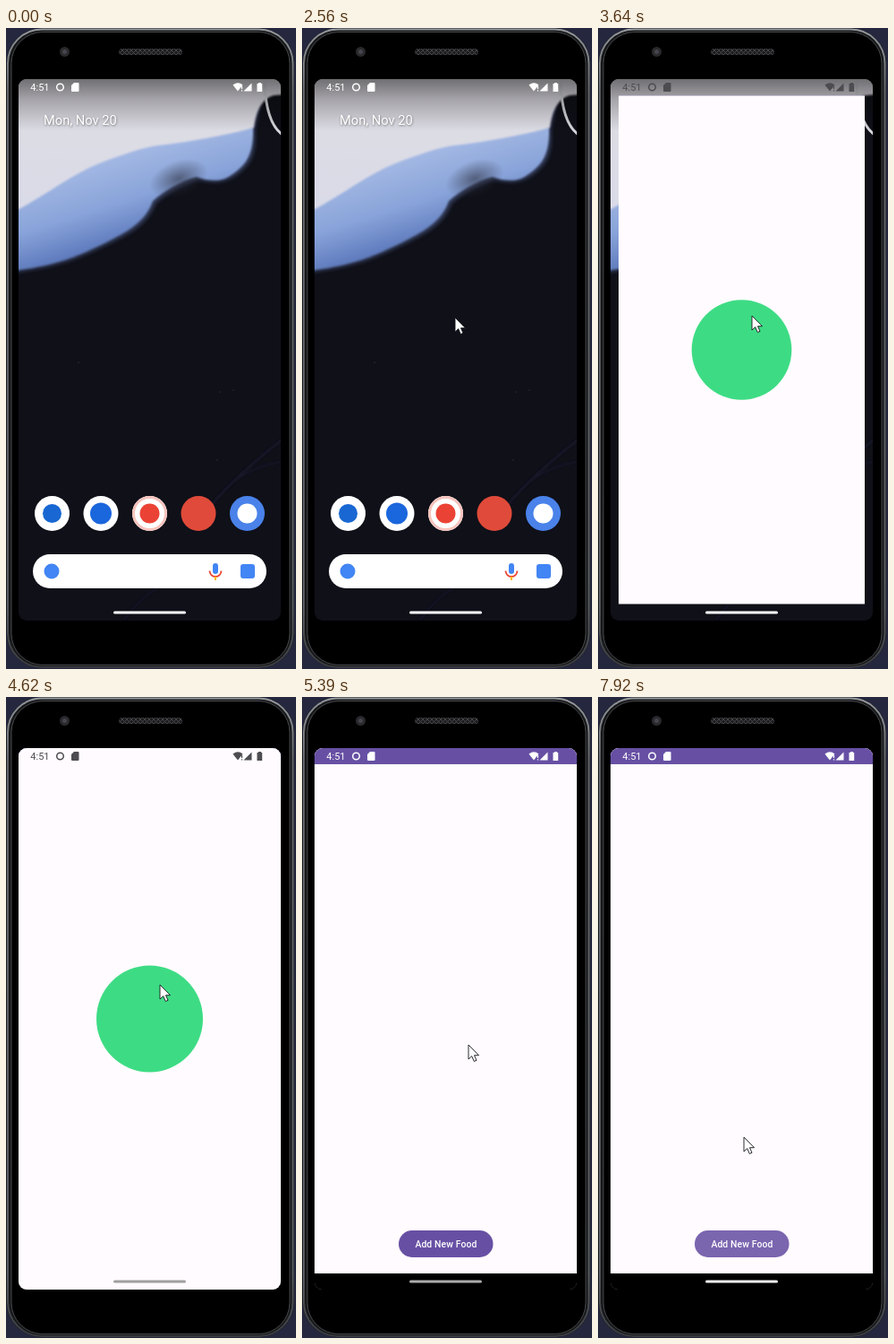
Write an HTML page that moves like this. It is 324 by 715 pixels and loops after 7.99 s.

```html
<!DOCTYPE html>
<html lang="en">
<head>
<meta charset="utf-8">
<title>Phone app launch</title>
<style>
html, body { margin: 0; width: 100%; height: 100%; overflow: hidden; background: #24273d; }
svg { display: block; width: 324px; height: 715px; font-family: Roboto, Arial, sans-serif; }
</style>
</head>
<body>
<svg viewBox="0 0 324 715" xmlns="http://www.w3.org/2000/svg">
  <defs>
    <clipPath id="screen"><rect x="14" y="57" width="293" height="604" rx="9"/></clipPath>
    <clipPath id="pill"><rect x="108" y="595" width="105.500" height="30" rx="15"/></clipPath>
    <linearGradient id="scrim" x1="0" y1="0" x2="0" y2="1">
      <stop offset="0" stop-color="#000" stop-opacity=".5"/>
      <stop offset=".4" stop-color="#000" stop-opacity=".25"/>
      <stop offset="1" stop-color="#000" stop-opacity="0"/>
    </linearGradient>
    <linearGradient id="blue" gradientUnits="userSpaceOnUse" x1="100" y1="145" x2="130" y2="240">
      <stop offset="0" stop-color="#a6bae4"/>
      <stop offset=".55" stop-color="#89a4da"/>
      <stop offset="1" stop-color="#5c78bb"/>
    </linearGradient>
    <linearGradient id="pale" x1="0" y1="0" x2="0" y2="1">
      <stop offset="0" stop-color="#dfdde2"/>
      <stop offset="1" stop-color="#d9dbe8"/>
    </linearGradient>
    <linearGradient id="metal" x1="0" y1="0" x2="0" y2="1">
      <stop offset="0" stop-color="#96999c"/>
      <stop offset=".1" stop-color="#62656a"/>
      <stop offset=".9" stop-color="#5a5d61"/>
      <stop offset="1" stop-color="#3a3c40"/>
    </linearGradient>
    <radialGradient id="shade">
      <stop offset="0" stop-color="#2c2f3c" stop-opacity=".6"/>
      <stop offset="1" stop-color="#2c2f3c" stop-opacity="0"/>
    </radialGradient>
    <pattern id="mesh" width="5" height="5" patternUnits="userSpaceOnUse">
      <path d="M0 0L5 5M5 0L0 5" stroke="#48484b" stroke-width=".9"/>
    </pattern>
    <filter id="soft" x="-10%" y="-10%" width="120%" height="120%"><feGaussianBlur stdDeviation="2"/></filter>
    <filter id="blur" x="-10%" y="-10%" width="120%" height="120%"><feGaussianBlur stdDeviation="1"/></filter>
  </defs>

  <rect width="324" height="715" fill="#24273d"/>
  <rect x=".5" y=".5" width="321.500" height="713.500" rx="39" fill="#17181a"/>
  <rect x="2" y="1.500" width="318.500" height="711.500" rx="38" fill="none" stroke="url(#metal)" stroke-width="2"/>
  <rect x="6" y="4.500" width="311" height="706" rx="35" fill="#000" stroke="#46484b"/>
  <circle cx="65.500" cy="26.500" r="5.500" fill="#29292c"/>
  <circle cx="65.500" cy="26.500" r="2.500" fill="#45454f"/>
  <rect x="126" y="23" width="71" height="7" rx="3.500" fill="#1d1d1f"/>
  <rect x="126" y="23" width="71" height="7" rx="3.500" fill="url(#mesh)"/>

  <g clip-path="url(#screen)">
    <g id="home">
      <rect x="14" y="57" width="293" height="604" fill="#0f1018"/>
      <g id="specks" fill="#3a3545"></g>
      <g fill="none" stroke="#1c1d33" opacity=".75" filter="url(#blur)">
        <path d="M310 458Q275 485 248 512T212 560" stroke-width="2.500"/>
        <path d="M308 484Q266 490 240 520T205 545M170 625Q150 635 132 660" stroke-width="1.500"/>
      </g>
      <path d="M5 273C60 267 85 255 112 242C145 227 159 216 167 196C178 185 198 174 215 169C230 174 244 173 256 165C275 153 280 138 278 112L292 50H5Z" fill="#4d5c88" opacity=".6" filter="url(#soft)"/>
      <path d="M5 271C60 265 85 252 112 239C142 224 156 214 164 193C176 182 196 170 213 166C230 172 243 171 253 163C270 152 277 138 276 110L200 110L5 150Z" fill="url(#blue)" filter="url(#blur)"/>
      <path d="M5 207C45 187 75 161 112 148C138 139 150 134 170 131C205 127 250 119 277 111C279 96 283 86 290 80S300 75 312 74V50H5Z" fill="url(#pale)" filter="url(#blur)"/>
      <ellipse cx="193" cy="168" rx="34" ry="20" fill="url(#shade)" transform="rotate(-20 193 168)"/>
      <path d="M289 62C290 88 296 110 309 119" fill="none" stroke="#d4d5da" stroke-width="3"/>
      <rect x="14" y="57" width="293" height="58" fill="url(#scrim)"/>
      <text x="42.500" y="108.700" font-size="14.700" fill="#333" opacity=".55" filter="url(#blur)">Mon, Nov 20</text>
      <text x="42" y="108" font-size="14.700" fill="#fff">Mon, Nov 20</text>

      <g id="dock"></g>
      <g id="newIcon">
        <circle cx="160.500" cy="541.500" r="19.500" fill="#d9efe3"/>
        <circle cx="160.500" cy="541.500" r="15.500" fill="#3ddc84"/>
      </g>
      <rect x="30" y="587" width="261" height="38" rx="19" fill="#fff"/>
      <circle cx="51" cy="606" r="8.500" fill="#4285f4"/>
      <rect x="231" y="597" width="6" height="12" rx="3" fill="#4285f4"/>
      <path d="M227.500 605.500A6.500 6.500 0 0 0 240.500 605.500" fill="none" stroke="#ea4335" stroke-width="1.800"/>
      <path d="M234 612V616" stroke="#fbbc04" stroke-width="2"/>
      <rect x="262" y="598" width="16" height="16" rx="3" fill="#4285f4"/>
    </g>

    <g id="window">
      <g id="app">
        <rect x="14" y="57" width="293" height="604" fill="#fffbfe"/>
        <rect x="14" y="57" width="293" height="18" fill="#6750a4"/>
        <rect x="14" y="643" width="293" height="18" fill="#000"/>
        <g clip-path="url(#pill)">
          <rect x="108" y="595" width="106" height="30" fill="#6750a4"/>
          <circle id="ripple" cx="168" cy="610" fill="#fff" opacity=".12"/>
        </g>
        <text x="160.900" y="614" font-size="10.400" font-weight="500" letter-spacing=".1" text-anchor="middle" fill="#fff">Add New Food</text>
      </g>
      <g id="splash">
        <rect x="14" y="57" width="293" height="604" fill="#fffbfe"/>
        <circle id="badge" cx="160.500" cy="359" r="59.500" fill="#3ddc84"/>
      </g>
    </g>
    <rect id="corners" x="10" y="639" width="301" height="26" fill="#000"/>
  </g>

  <g id="status">
    <text x="27.300" y="70" font-size="11">4:51</text>
    <circle cx="60.500" cy="66" r="3.800" fill="none" stroke="currentColor" stroke-width="1.500"/>
    <path d="M76 61H80.500Q81.500 61 81.500 62V70Q81.500 71 80.500 71H74Q73 71 73 70V64Z"/>
    <path d="M253.500 63.500Q259 59 264.500 63.500L259 70.500Z"/>
    <path d="M263.500 65V68M263.500 69.300V70.500" fill="none" stroke="currentColor" stroke-width="1.200"/>
    <path d="M274.500 61.500V70.500H265.500Z"/>
    <path d="M282 61H285V62H286.200V71H280.500V62H282Z"/>
  </g>
  <rect id="handle" x="120" y="650.500" width="81" height="3" rx="1.500"/>
  <circle id="press" cx="168" cy="610" r="12" fill="#d7c814" opacity=".62"/>
  <path id="cursor" d="M0 0V16L3.700 12.600L6.300 18.500L9 17.300L6.500 11.700H11.500Z" stroke="#15151a" stroke-width=".9" stroke-linejoin="round"/>
</svg>
<script>
const LOOP = 7990;
const el = id => document.getElementById(id);
const set = (id, attrs) => {
  for (const key in attrs) el(id).setAttribute(key, attrs[key]);
};
const ramp = (t, from, to) => Math.min(1, Math.max(0, (t - from) / (to - from)));
const mix = (a, b, u) => a + (b - a) * u;
const smooth = u => u * u * (3 - 2 * u);
const grey = v => `rgb(${v},${v},${v})`;
const show = on => ({ visibility: on ? "visible" : "hidden" });

// Dock: centre x, disc colour, inner mark colour, mark radius, ring colour
const dock = [
  [51.5, "#fff", "#1967d2", 10.5, "none"],
  [106, "#fff", "#1a66dc", 12, "none"],
  [160.5, "#fff", "#ea4335", 11, "#f6c3bd"],
  [215, "#e04a3a", "none", 0, "none"],
  [269.5, "#4a82ea", "#fff", 11, "none"]
];
el("dock").innerHTML = dock.map(([x, disc, mark, r, ring]) =>
  `<circle cx="${x}" cy="541.5" r="19.5" fill="${disc}"/>` +
  `<circle cx="${x}" cy="541.5" r="18" fill="none" stroke="${ring}" stroke-width="3"/>` +
  `<circle cx="${x}" cy="541.5" r="${r}" fill="${mark}"/>`).join("");

const specks = [[81, 373], [239, 406], [254, 404], [236, 482]];
el("specks").innerHTML = specks.map(([x, y]) => `<circle cx="${x}" cy="${y}" r=".7"/>`).join("");

// Pointer moves: start, end, then start point, control point and end point
const moves = [
  [190, 850, 296, 666, 180, 300, 22, -22],
  [1880, 2560, 74, 21, 210, 200, 171, 323],
  [3090, 3500, 171, 323, 172, 322, 172, 321],
  [4900, 5390, 172, 321, 178, 350, 186, 388],
  [5460, 6230, 186, 388, 204, 440, 168, 611],
  [6290, 6490, 168, 611, 169, 611, 169, 611],
  [7170, 7790, 169, 611, 172, 560, 163, 492],
  [7850, 7920, 163, 492, 163, 492, 163, 491]
];

function pointer(t) {
  const move = moves.filter(m => m[0] <= t).pop();
  if (!move) return null;
  const [from, to, x0, y0, cx, cy, x1, y1] = move;
  const u = smooth(ramp(t, from, to));
  const curve = (a, c, b) => mix(mix(a, c, u), mix(c, b, u), u);
  return [curve(x0, cx, x1), curve(y0, cy, y1)];
}

function draw(t) {
  set("newIcon", { opacity: ramp(t, 3090, 3300) });

  // Window opening
  const open = ramp(t, 3500, 3780);
  const scale = mix(.85, 1, 1 - Math.pow(1 - open, 1.27));
  set("window", {
    opacity: Math.min(1, open * 2.52),
    transform: `translate(160.5 359) scale(${scale}) translate(-160.5 -359)`
  });

  // Splash gives way to the app
  set("badge", { opacity: 1 - ramp(t, 4690, 4900) });
  const reveal = ramp(t, 4830, 5040);
  set("splash", { opacity: 1 - reveal });
  set("corners", { y: 643, opacity: reveal });

  const dark = t >= 3500 && t < 4900;
  const ink = dark ? "#4d4c50" : "#fff";
  set("status", { fill: ink, color: ink });

  let tone = mix(255, 160, ramp(t, 3850, 4410));
  if (t > 4900) tone = mix(160, 172, ramp(t, 4900, 5390));
  if (t > 5390) tone = mix(172, 240, ramp(t, 5390, 6300));
  set("handle", { fill: grey(Math.round(tone)) });

  // Button press
  const pressed = t >= 7030 && t < 7170;
  set("press", show(pressed));
  set("ripple", { r: 70 * smooth(ramp(t, 7080, 7420)) });

  const at = pointer(t);
  set("cursor", {
    ...show(at),
    transform: at ? `translate(${at[0]} ${at[1]})` : "",
    fill: pressed ? "#fdf7b0" : "#fff"
  });
}

const start = performance.now();
function tick() {
  draw((performance.now() - start) % LOOP);
  requestAnimationFrame(tick);
}
tick();
</script>
</body>
</html>
```
